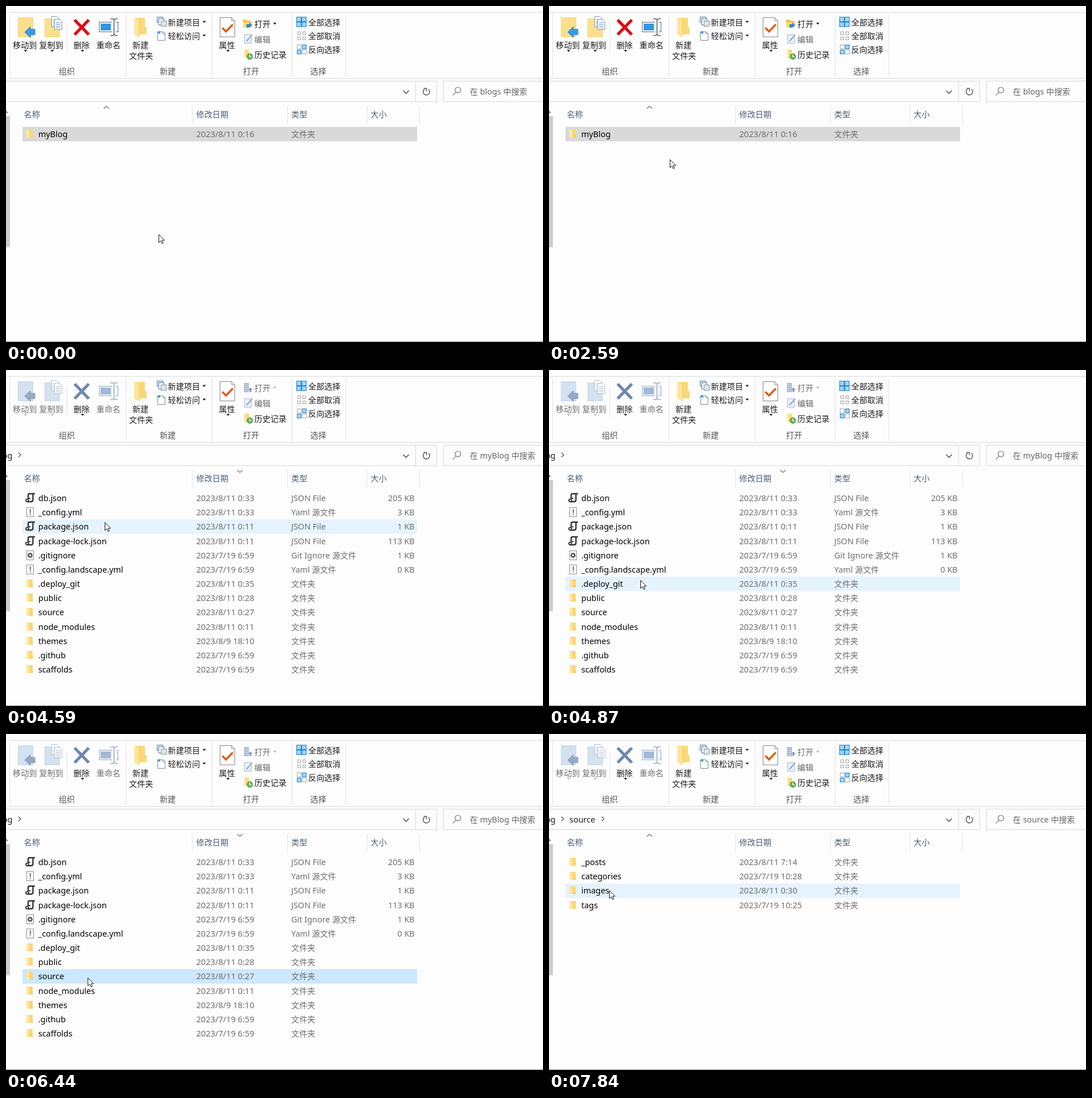
These frames come from a looping animation (947 px wide and 592 px high, 8000 ms). An HTML page with a canvas:

```html
<!DOCTYPE html>
<html lang="zh-CN">
<head>
<meta charset="utf-8">
<title>文件夹浏览</title>
<style>
html, body { margin: 0; width: 100%; height: 100%; overflow: hidden; background: #fdfdfd; }
canvas { display: block; }
</style>
</head>
<body>
<canvas id="stage" width="947" height="592"></canvas>
<script>
const ctx = document.getElementById('stage').getContext('2d');
const LOOP = 8000;
const ROW_TOP = 213, ROW_PITCH = 25.17;
const INK = '#1c1c1c', GREY = '#6d6d6d', DIM = '#707070', LINE = '#dcdddd';

// time, x, y of the pointer
const POINTER = [
  [0, 269, 402], [720, 269, 403], [1000, 270, 405], [1870, 300, 411], [2000, 365, 421],
  [2150, 432, 446], [2280, 702, 481], [2440, 444, 367], [2590, 213, 270], [2720, 178, 235],
  [3280, 178, 236], [3870, 178, 235], [4440, 177, 236], [4590, 174, 268], [4720, 168, 313],
  [4870, 161, 370], [5000, 151, 397], [5160, 146, 416], [5310, 144, 426], [5440, 144, 429],
  [7280, 144, 396], [7410, 144, 340], [7560, 126, 306], [7690, 111, 284], [7840, 106, 275]
];

const folder = (name, date) => ({ name, date, type: '文件夹', icon: smallFolder });
const json = (name, date, size) => ({ name, date, size, type: 'JSON File', icon: scrollIcon });
const yaml = (name, date, size) => ({ name, date, size, type: 'Yaml 源文件', icon: yamlIcon });

const VIEWS = {
  blogs: [folder('myBlog', '2023/8/11 0:16')],
  myBlog: [
    json('db.json', '2023/8/11 0:33', '205 KB'),
    yaml('_config.yml', '2023/8/11 0:33', '3 KB'),
    json('package.json', '2023/8/11 0:11', '1 KB'),
    json('package-lock.json', '2023/8/11 0:11', '113 KB'),
    { name: '.gitignore', date: '2023/7/19 6:59', size: '1 KB', type: 'Git Ignore 源文件', icon: gearIcon },
    yaml('_config.landscape.yml', '2023/7/19 6:59', '0 KB'),
    folder('.deploy_git', '2023/8/11 0:35'),
    folder('public', '2023/8/11 0:28'),
    folder('source', '2023/8/11 0:27'),
    folder('node_modules', '2023/8/11 0:11'),
    folder('themes', '2023/8/9 18:10'),
    folder('.github', '2023/7/19 6:59'),
    folder('scaffolds', '2023/7/19 6:59')
  ],
  source: [
    folder('_posts', '2023/8/11 7:14'),
    folder('categories', '2023/7/19 10:28'),
    folder('images', '2023/8/11 0:30'),
    folder('tags', '2023/7/19 10:25')
  ]
};

function rect(x, y, w, h, fill, stroke) {
  if (fill) { ctx.fillStyle = fill; ctx.fillRect(x, y, w, h); }
  if (stroke) { ctx.strokeStyle = stroke; ctx.lineWidth = 1; ctx.strokeRect(x + .5, y + .5, w - 1, h - 1); }
}

function shape(d, fill, stroke, width = 1) {
  const path = new Path2D(d);
  if (fill) { ctx.fillStyle = fill; ctx.fill(path); }
  if (stroke) { ctx.strokeStyle = stroke; ctx.lineWidth = width; ctx.stroke(path); }
}

// Latin and Chinese runs differ slightly in size.
function text(str, x, y, color = INK, align = 'left') {
  const runs = str.match(/[\u2e80-\u9fff]+|[^\u2e80-\u9fff]+/g).map(run => {
    const font = run.charCodeAt(0) > 0x2e7f
      ? '14.15px "Noto Sans CJK SC", "Noto Sans CJK", sans-serif'
      : `${/^\d{4}\//.test(run) ? 14.65 : 14.45}px "Noto Sans", "Open Sans", sans-serif`;
    ctx.font = font;
    return { run, font, width: ctx.measureText(run).width };
  });
  if (align === 'right') x -= runs.reduce((sum, r) => sum + r.width, 0);
  ctx.fillStyle = color;
  for (const r of runs) {
    ctx.font = r.font;
    ctx.fillText(r.run, x, y);
    x += r.width;
  }
}

function triangle(x, y, color = '#111') {
  shape(`M${x - 3} ${y - 1.5}h6l-3 3.3z`, color);
}

function at(x, y, draw, ...args) {
  ctx.save();
  ctx.translate(x, y);
  draw(...args);
  ctx.restore();
}

function tallFolder() {
  shape('M0 0H19V16H22V29H8L0 30z', '#f9d877');
  shape('M0 0L9 4V34L0 30z', '#ffe59b');
  shape('M9 4V34', null, '#f0cc67');
}

function smallFolder() {
  rect(36, 5, 11, 14, '#f8d677');
  shape('M36 5l5 1v14l-5-2z', '#ffe7a2');
  shape('M46.5 14v5', null, '#eec45a');
}

function scrollIcon() {
  shape('M51 5H42Q39 5 39 8V13M47.5 5V15.5Q47.5 19 44 19H38', null, '#333', 2.4);
  shape('M39.8 16.8a2.4 2.4 0 1 0-4.8 0a2.4 2.4 0 1 0 4.8 0M38.5 13.2H43', null, '#333', 2);
}

function page() {
  rect(36, 4, 13, 17, '#fff', '#8d8d8d');
}

function yamlIcon() {
  page();
  rect(42, 7, 1.6, 7, '#5b4a68');
  rect(42, 15.5, 1.6, 2, '#5b4a68');
}

function gearIcon() {
  page();
  ctx.strokeStyle = '#4d5960';
  ctx.lineWidth = 2;
  ctx.beginPath();
  ctx.arc(42.5, 12.5, 2.8, 0, 7);
  for (let i = 0; i < 8; i++) {
    const c = Math.cos(i * Math.PI / 4), s = Math.sin(i * Math.PI / 4);
    ctx.moveTo(42.5 + 3 * c, 12.5 + 3 * s);
    ctx.lineTo(42.5 + 4.7 * c, 12.5 + 4.7 * s);
  }
  ctx.stroke();
}

function sheet(x, y, line) {
  shape(`M${x} ${y}h9l4 4v14h-13z`, '#fff', line);
  for (let i = 0; i < 4; i++) shape(`M${x + 2.5} ${y + 6 + i * 3}h8`, null, line);
}

function organizeGroup(on) {
  const base = on ? '#fbdf8c' : '#d3e1f0', edge = on ? '#f4d67c' : '#c8d7e9';
  const label = on ? INK : DIM, mark = on ? '#111' : '#b5b5b5';
  rect(21, 20, 27, 35, base, edge);
  shape('M33 46L43 36.5V41H51V50.5H43V55.5z', on ? '#389bea' : '#97a9c4', on ? '#2681cd' : '#8598b6');
  rect(68, 22, 27, 33, base, edge);
  const line = on ? '#6f93bd' : '#a9bbd3';
  sheet(80.5, 18.5, line);
  sheet(85.5, 23.5, line);
  shape('M121 24.5L146 50.5M146 24.5L121 50.5', null, on ? '#df0b12' : '#7188ae', 5.4);
  const bar = on ? '#55636f' : '#97a8c4';
  rect(164, 28, 34, 18, on ? '#fff' : '#edf2f8', bar);
  rect(167, 31, 18, 12, on ? '#3296e4' : '#a3b7d6');
  rect(187, 27, 7, 20, '#fdfdfd');
  shape('M184 22.5H188.5L190.5 24.5L192.5 22.5H197M184 52H188.5L190.5 50L192.5 52H197M190.5 24V51', null, bar, 1.6);
  text('移动到', 12, 74, label);
  text('复制到', 58.5, 74, label);
  text('删除', 119, 74);
  text('重命名', 159.5, 74, label);
  triangle(34.5, 79, mark);
  triangle(81.5, 79, mark);
  triangle(135, 79);
  text('组织', 93, 120, '#555');
}

function newGroup() {
  at(226, 21, tallFolder);
  text('新建', 223, 74);
  text('文件夹', 217, 92.5);
  rect(266, 19, 11, 10, '#d9ebf8', '#56789a');
  rect(269, 22, 10, 12, '#fff', '#56789a');
  rect(273, 26, 10, 10, '#fff', '#6b7f92');
  shape('M275 29.5h6M275 32.5h6', null, '#9eb3c6');
  shape('M267.5 45.5H277L280.5 49V60.5H267.5z', '#fff', '#7c8791');
  shape('M277 45.5V49H280.5', null, '#7c8791');
  rect(265, 44, 6, 6, '#fdfdfd');
  shape('M266 49L270.5 45.5M267 45.5h4v4', null, '#2880c5', 1.5);
  text('新建项目', 285.5, 33.5);
  text('轻松访问', 285.5, 57.5);
  triangle(349.5, 28);
  triangle(349.5, 52);
  text('新建', 271, 120, '#555');
}

function openGroup(on) {
  shape('M377.5 20.5H398L403.5 26V54.5H377.5z', '#fff', '#858585');
  shape('M398 20.5V26H403.5', null, '#858585');
  shape('M381.5 38.5L388 45L400 32.5', null, '#df5b14', 3.4);
  text('属性', 375.5, 74);
  triangle(391.5, 79);
  if (on) {
    shape('M418 24h6l2 2h7v12h-15z', '#f4c544');
    rect(418, 29, 16, 9, '#ffdd78');
    shape('M424 38V32H429V29L434 33.5L429 38z', '#2b86d3');
  } else {
    rect(420, 23, 8, 16, '#c5d3e5', '#8fa2bf');
    shape('M422 27h4M422 31h4M422 35h4', null, '#8196b5');
    shape('M427 35l4-4l4 4h-2.5v4h-3v-4z', '#8498b8');
  }
  text('打开', 438, 36.5, on ? INK : DIM);
  triangle(474, 31, on ? '#111' : '#b5b5b5');
  rect(420, 50, 13, 16, '#eaf1f8', '#a4b8ce');
  shape('M424 62L434 51', null, '#8fabc9', 2.4);
  text('编辑', 438, 63.5, '#686868');
  at(420, 77, () => { ctx.scale(.45, .47); tallFolder(); });
  ctx.beginPath();
  ctx.arc(430, 89, 5, 0, 7);
  ctx.fillStyle = '#67b652';
  ctx.fill();
  ctx.strokeStyle = '#3b8a33';
  ctx.lineWidth = 1;
  ctx.stroke();
  shape('M430 85.5V89.5H433', null, '#fff', 1.3);
  text('历史记录', 438, 90.5);
  text('打开', 418, 120, '#555');
}

function tiles(x, y, size, gap, isFilled) {
  for (let i = 0; i < 4; i++) {
    const filled = isFilled(i);
    rect(x + (i % 2) * (size + gap), y + (i >> 1) * (size + gap), size, size,
      filled ? '#9dd4fa' : '#fff', filled ? '#2582c5' : '#a5a5a5');
  }
}

function selectGroup() {
  tiles(512, 19, 9, 0, () => true);
  tiles(514, 45, 6, 3, () => false);
  tiles(513, 68, 8, 1, i => i === 1 || i === 2);
  text('全部选择', 533, 33.5);
  text('全部取消', 533, 58);
  text('反向选择', 533, 82);
  text('选择', 536.5, 120, '#555');
}

function ribbon(on) {
  rect(0, 11, 947, 1, LINE);
  rect(0, 127, 947, 1, '#d6d7d8');
  for (const x of [6, 211, 363, 504, 599]) rect(x, 14, 1, 111, '#e1e2e3');
  rect(107, 30, 1, 53, '#e1e2e3');
  organizeGroup(on);
  newGroup();
  openGroup(on);
  selectGroup();
}

function addressBar(view, t) {
  rect(-2, 132, 762, 37, '#fdfdfd', '#d7d7d7');
  rect(722, 132, 1, 37, '#d7d7d7');
  rect(771, 132, 180, 37, '#fdfdfd', '#d7d7d7');
  shape('M700.5 149L705.5 154L710.5 149', null, '#555', 1.6);
  shape('M738 146.3A5.8 5.8 0 1 0 745 146.5', null, '#555', 1.5);
  shape('M736.5 145.2h5v5', null, '#555', 1.5);
  shape('M802 148a5 5 0 1 0-10 0a5 5 0 1 0 10 0M793.3 151.8L788 157.3', null, '#747474', 1.2);
  text(`在 ${view} 中搜索`, 818, 156, '#666');
  const chevron = x => shape(`M${x} 145.5l4 4l-4 4`, null, '#555', 1.3);
  if (view !== 'blogs') text('og', 11.3, 156, INK, 'right');
  if (t >= 4150) chevron(22);
  if (view === 'source') text('source', 36, 156);
  if (t >= 7000) chevron(93);
}

function listHeader(view) {
  for (const x of [328, 496, 636, 729]) rect(x, 175, 1, 32, '#e3e3e3');
  const labels = { 名称: 31.5, 修改日期: 335.5, 类型: 503, 大小: 643 };
  for (const name in labels) text(name, labels[name], 196, '#4a5d75');
  shape(view === 'myBlog' ? 'M408 176.5l4.5 4l4.5-4' : 'M172.5 180.5l4.5-4l4.5 4', null, '#666', 1.1);
  rect(0, 194, 7, 231, '#cdcdcd');
  shape('M0 185.5L2.5 188.5', null, '#444', 1.4);
}

function fileList(files, hover, selected) {
  files.forEach((file, i) => {
    const exact = ROW_TOP + i * ROW_PITCH, top = Math.round(exact), base = top + 18.3;
    const isHover = i === hover, isSelected = i === selected;
    if (isHover || isSelected) {
      rect(29, exact, 696, 25.5, !isSelected ? '#e5f3ff' : isHover ? '#cce8ff' : '#d9d9d9');
    }
    at(0, top, file.icon);
    text(file.name, 57, base, '#000');
    text(file.date, 335.5, base, GREY);
    text(file.type, 503, base, GREY);
    if (file.size) text(file.size, 720.5, base, GREY, 'right');
  });
}

function tooltip(alpha) {
  ctx.save();
  ctx.globalAlpha = alpha;
  rect(157, 490, 393, 2, '#b5b5b5');
  rect(548, 414, 2, 76, '#b5b5b5');
  rect(154, 411, 394, 79, '#fff', '#767676');
  ['创建日期: 2023/8/11 0:16', '大小: 1.49 MB',
    '文件夹: 2023, archives, categories, css, images, img, js, ...',
    '文件: index.html, search.xml'
  ].forEach((line, i) => text(line, 159.5, 428 + i * 18.8, '#575757'));
  ctx.restore();
}

function pointer() {
  shape('M.5 .7V14.8L3.8 11.7L6 16.6L8.2 15.7L6.1 10.9H10.5z', '#fff', '#111');
}

function draw(t) {
  const [, x, y] = POINTER.findLast(key => key[0] <= t);
  const view = t < 3870 ? 'blogs' : t < 6720 ? 'myBlog' : 'source';
  const hasSelection = t < 3870 || (t >= 6590 && t < 6720);
  const selected = view === 'blogs' ? 0 : view === 'myBlog' && t >= 6440 ? 8 : -1;
  rect(0, 0, 947, 592, '#fdfdfd');
  ribbon(hasSelection);
  addressBar(view, t);
  listHeader(view);
  fileList(VIEWS[view], Math.floor((y - ROW_TOP) / ROW_PITCH), selected);
  if (t >= 5160 && t < 5440) tooltip(t < 5310 ? .72 : .25);
  rect(0, 591, 947, 1, '#8c8c8c');
  at(x, y, pointer);
}

const start = performance.now();
function tick() {
  draw((performance.now() - start) % LOOP);
  requestAnimationFrame(tick);
}
tick();
</script>
</body>
</html>
```
